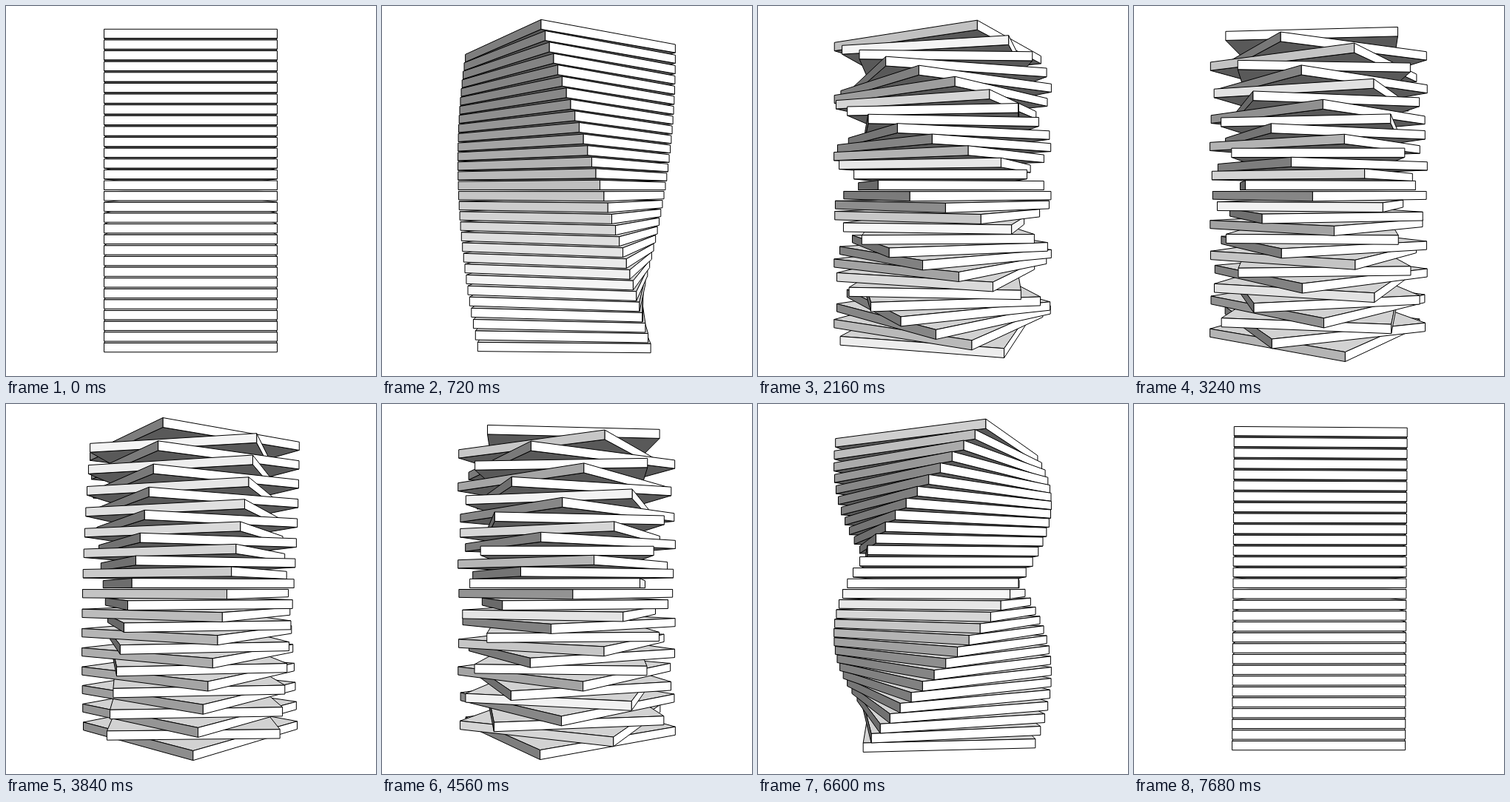
An HTML page with a canvas for the animation above (7.8 s loop, 500 px wide and 500 px high).

```html
<!DOCTYPE html>
<html lang="en">
<head>
<meta charset="utf-8">
<title>Twisting stack</title>
<style>
  html, body { margin: 0; width: 100%; height: 100%; overflow: hidden; background: #fff; }
  canvas { display: block; width: 500px; height: 500px; }
</style>
</head>
<body>
<canvas id="stage" width="500" height="500"></canvas>
<script>
const ctx = document.getElementById('stage').getContext('2d');

const STEPS = 65, STEP_MS = 120;
const COUNT = 30;
const CENTER = 249.5;
// Lengths are in units of half a slab's side.
const CAMERA = 7.9, FOCAL = 117 * (CAMERA - 1);
const PITCH = 0.125, THICK = 0.105;
const RADIUS = Math.SQRT2, QUARTER = Math.PI / 2;

const AMBIENT = 0.35, LAMP = 0.37;
const LIGHTS = [[1, 0, 1], [1, 1, 1], [0, 1, 1]].map(v => {
  const len = Math.hypot(...v);
  return v.map(c => c / len);
});

function shade(nx, ny, nz) {
  let sum = AMBIENT;
  for (const [x, y, z] of LIGHTS) sum += LAMP * Math.max(0, nx * x + ny * y + nz * z);
  const g = Math.round(255 * Math.min(1, sum));
  return `rgb(${g},${g},${g})`;
}

function project([x, z], y) {
  const k = FOCAL / (CAMERA - z);
  return [CENTER + x * k, CENTER - y * k];
}

function face(points, fill) {
  ctx.beginPath();
  points.forEach(p => ctx.lineTo(...p));
  ctx.closePath();
  ctx.fillStyle = fill;
  ctx.fill();
  ctx.stroke();
}

function drawSlab(index, angle) {
  const mid = (index - (COUNT + 1) / 2) * PITCH;
  const low = mid - THICK / 2, high = mid + THICK / 2;
  const corners = [0, 1, 2, 3].map(k => {
    const a = angle + QUARTER * (k + 0.5);
    return [RADIUS * Math.cos(a), RADIUS * Math.sin(a)];
  });

  // Above eye level the underside shows, below it the top.
  const above = mid > 0;
  face(corners.map(c => project(c, above ? low : high)), shade(0, above ? -1 : 1, 0));

  for (let k = 0; k < 4; k++) {
    const normal = angle + QUARTER * (k + 1);
    const nx = Math.cos(normal), nz = Math.sin(normal);
    if (nz * CAMERA <= 1) continue;
    const a = corners[k], b = corners[(k + 1) % 4];
    face([project(a, low), project(b, low), project(b, high), project(a, high)],
         shade(nx, 0, nz));
  }
}

function draw(time) {
  const step = Math.floor(time / STEP_MS) % STEPS;
  const twist = QUARTER * (1 - Math.cos(Math.PI * step / STEPS)) / 2;

  ctx.fillStyle = '#fff';
  ctx.fillRect(0, 0, 500, 500);
  ctx.strokeStyle = '#000';
  ctx.lineWidth = 1;
  ctx.lineJoin = 'round';

  // Slabs nearer eye level cover those farther from it.
  for (let i = 1; i <= COUNT / 2; i++) {
    for (const index of [i, COUNT + 1 - i]) drawSlab(index, index * twist);
  }
}

const start = performance.now();
function tick() {
  draw(performance.now() - start);
  requestAnimationFrame(tick);
}
tick();
</script>
</body>
</html>
```
